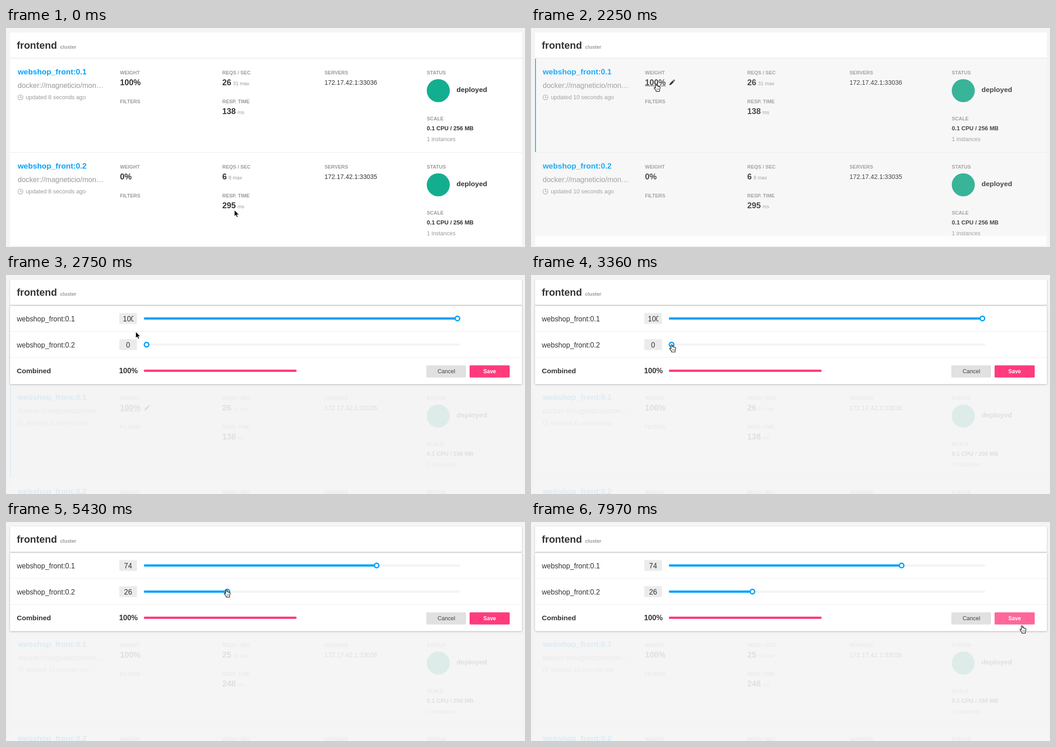
An HTML page for the animation above (8 s loop, 1152 by 486 pixels).

```html
<!DOCTYPE html>
<html lang="en">
<head>
<meta charset="utf-8">
<title>Cluster weights</title>
<style>
html, body { margin: 0; width: 100%; height: 100%; overflow: hidden; background: #f4f4f4; }
svg { display: block; font-family: "Liberation Sans", Arial, sans-serif; }
text { white-space: pre; }
</style>
</head>
<body>
<svg id="stage" width="1152" height="486" viewBox="0 0 1152 486"></svg>
<script>
const LOOP = 8000, DARK = '#333', GREY = '#999', BLUE = '#05a3fa', PINK = '#ff3b7c';
const stage = document.getElementById('stage');

const text = (x, y, size, str, fill = DARK, bold = false, extra = '') =>
  `<text x="${x}" y="${y}" font-size="${size}" fill="${fill}"${bold ? ' font-weight="700"' : ''} ${extra}>${str}</text>`;
const rect = (x, y, w, h, fill, extra = '') =>
  `<rect x="${x}" y="${y}" width="${w}" height="${h}" fill="${fill}" ${extra}/>`;
const group = (x, y, body, extra = '') => `<g transform="translate(${x} ${y})" ${extra}>${body}</g>`;
const label = (x, y, str) => text(x, y, 11, str, GREY, true);

// Pointer moves: start, end, number of steps, x and y reached
const START = [507, 404];
const MOVES = [
  [360, 360, 1, 456, 330],
  [530, 1150, 8, 289, 127],
  [1330, 1330, 1, 281, 127],
  [1600, 1770, 3, 278, 124],
  [2750, 2750, 1, 288, 126],
  [2900, 3450, 7, 313, 155],
  [4520, 4520, 1, 312, 155],
  [4810, 4810, 1, 336, 155],
  [4960, 5070, 2, 373, 153],
  [5220, 5430, 3, 489, 150],
  [5790, 6220, 6, 1081, 213],
  [6670, 6670, 1, 1081, 212],
  [7620, 7620, 1, 1083, 214],
  [7800, 7970, 3, 1090, 230]
];
const WEIGHTS = [[4960, 4], [5070, 9], [5220, 18], [5325, 24], [5430, 26]];

function pointer(t) {
  let [x, y] = START;
  for (const [t0, t1, n, tx, ty] of MOVES) {
    if (t < t0) break;
    const step = n > 1 ? Math.min(n, 1 + Math.floor((t - t0) / (t1 - t0) * (n - 1) + 1e-6)) : 1;
    const p = step / n, ease = n > 3 ? 1 - (1 - p) ** 2 : p;
    x += (tx - x) * ease;
    y += (ty - y) * ease;
  }
  return [x, y];
}

const SHAPES = {
  arrow: '<path d="M0 0V14L3.2 11 5.4 16 7.8 15 5.6 10.2H10Z" fill="#000" stroke="#fff" stroke-width=".9"/>',
  beam: '<path d="M-3-7.5Q-.5-7.5 0-6Q.5-7.5 3-7.5M0-6V6M-3 7.5Q-.5 7.5 0 6Q.5 7.5 3 7.5M-1.5 2H1.5" fill="none" stroke="#222" stroke-width="1.2"/>',
  hand: '<path d="M-1.6 9V1.5Q-1.6.2-.3.2T1 1.5V5Q3-.3 3.6 5.6Q5.6 4.6 6.2 6.4Q8.6 5.6 8.6 8.4Q8.6 11 7.4 13V16.6H-.4V14.6L-4.5 9.8Q-5.2 8.4-4 8Q-2.8 7.8-1.6 9Z" fill="#fff" stroke="#111" stroke-width="1.2"/>' +
    '<path d="M1.4 10.5V13M3.4 10.5V13M5.4 10.5V13" stroke="#333" stroke-width=".9"/>'
};

function cursor(t) {
  const [x, y] = pointer(t);
  const onThumb = t >= 3355 && t < 5790;
  const shape = t >= 1150 && t < 1600 ? 'beam'
    : t >= 1600 && t < 2750 || onThumb || t >= 6134 ? 'hand' : 'arrow';
  return group(x.toFixed(1), y.toFixed(1), SHAPES[shape]);
}

const CLOCK = `<g fill="none" stroke="${GREY}" stroke-width="1.1"><circle cx="32" cy="86" r="5.5"/><path d="M32 82.5V86.5H35"/></g>`;
const PENCIL = '<path d="M307 59L308 55.2 314.6 48.6 317.4 51.4 310.8 58ZM315.4 47.8L316.4 46.8Q317.2 46.2 318 47L319 48Q319.8 48.8 319.2 49.6L318.2 50.6Z" fill="#222"/>';

function service(y, s, age, hover, back, pulse) {
  const value = (top, num, unit) =>
    text(480, top, 18, num, DARK, true) + text(484 + 10 * String(num).length, top, 11, unit, GREY);
  return group(0, y,
    rect(9, 0, 1136, 208, back) +
    (hover ? rect(9, 0, 2, 207, '#12b0ea') + PENCIL : '') +
    text(26, 35, 17.2, s.name, BLUE, true) +
    text(26, 65, 16, 'docker://magneticio/mon…', GREY) +
    CLOCK + text(44, 90, 12.8, `updated ${age} seconds ago`, GREY) +
    label(253, 35, 'WEIGHT') + text(253, 59, 18, s.weight + '%', DARK, true) +
    (hover ? rect(253, 60, 46, 1, DARK) : '') +
    label(253, 99, 'FILTERS') +
    label(480, 35, 'REQS / SEC') + value(59, s.reqs, s.max + ' max') +
    label(480, 99, 'RESP. TIME') + value(123, s.ms, 'ms') +
    label(707, 35, 'SERVERS') + text(707, 58, 14, '172.17.42.1:' + s.port) +
    label(934, 35, 'STATUS') +
    `<circle cx="959.5" cy="71" r="25.6" fill="${pulse ? '#22ad8e' : '#13ae90'}"/>` +
    text(1000, 74, 15.5, 'deployed', DARK, true) +
    label(934, 137, 'SCALE') +
    text(934, 159, 12.8, '0.1 CPU / 256 MB', DARK, true) +
    text(934, 183, 12.6, '1 instances', GREY));
}

function list(t) {
  const open = t >= 2750, y = open ? 242 : 68;
  const hover = t >= 1600 && t < 3000, fresh = t >= 4960, fading = t >= 2250 && !open;
  const age = t < 2250 ? 8 : t < 2750 ? 10 : fresh ? 13 : 11;
  const opacity = t < 2250 ? 1 : t < 2420 ? .89 : open ? .1 : .4;
  const first = { name: 'webshop_front:0.1', weight: 100, port: 33036,
    reqs: fresh ? 25 : 26, max: fresh ? 33 : 31, ms: fresh ? 248 : 138 };
  const second = { name: 'webshop_front:0.2', weight: 0, port: 33035, reqs: 6, max: 8, ms: 295 };
  const shade = t < 1685 ? '#fbfbfb' : '#f8f8f8';
  return `<g opacity="${opacity}">` +
    service(y, first, age, hover, hover ? shade : '#fff', t >= 800) +
    service(y + 209, second, age, false, fading ? '#f8f8f8' : '#fff', t >= 800) +
    rect(9, y + 207.5, 1136, 1.5, '#f0f0f0') + '</g>' +
    (fading ? rect(9, 461, 1136, 23, '#fdfdfd') : '') +
    (open ? '' : rect(9, 484, 1136, 1, '#ebebeb'));
}

function slider(y, name, value) {
  const x = 312 + 6.9 * value;
  const num = value > 99 ? text(1.5, 18, 16, value) : text(13, 18, 16, value, DARK, false, 'text-anchor="middle"');
  return text(24, y + 6, 15.7, name) +
    rect(251.5, y - 12, 39, 24, '#ebebeb') +
    `<svg x="258" y="${y - 12}" width="25" height="24">${num}</svg>` +
    rect(306, y - 2.5, 702, 5, '#f4f4f4', 'rx="2"') +
    rect(306, y - 2.5, x - 306, 5, BLUE, 'rx="2"') +
    `<circle cx="${x}" cy="${y}" r="5" fill="#fff" stroke="${BLUE}" stroke-width="3"/>`;
}

function editor(t) {
  const value = WEIGHTS.reduce((v, [at, w]) => t >= at ? w : v, 0);
  const save = t < 6134 ? PINK : t < 7960 ? '#ff6c9e' : '#ff6699';
  return rect(9, 68, 1136, 174, '#fff', 'rx="2" style="filter:drop-shadow(0 1px 2px rgba(0,0,0,.26))"') +
    slider(96.5, 'webshop_front:0.1', 100 - value) +
    rect(9, 124.5, 1136, 1.2, '#efefef') +
    slider(154.5, 'webshop_front:0.2', value) +
    rect(9, 182.5, 1136, 1.2, '#efefef') +
    text(24, 218, 15.5, 'Combined', DARK, true) +
    text(251, 218, 16.2, '100%', DARK, true) +
    rect(306, 210, 339, 5, PINK, 'rx="2"') +
    rect(933, 200.5, 88, 27, '#e1e1e1', 'rx="2"') +
    text(977.5, 218, 12.6, 'Cancel', '#444', false, 'text-anchor="middle"') +
    rect(1029, 200.5, 89, 27, save, 'rx="2"') +
    text(1073.5, 218, 12, 'Save', '#fff', true, 'text-anchor="middle"');
}

function header(open) {
  const shadow = open ? 'style="filter:drop-shadow(0 1px 1.5px rgba(0,0,0,.26))"' : '';
  return rect(9, 10, 1136, 56.5, '#fff', 'rx="2" ' + shadow) +
    rect(9, 66, 1136, 1.6, open ? '#d6d6d6' : '#ececec') +
    text(24, 45.5, 22, 'frontend', DARK, true) +
    text(120, 45.5, 11, 'cluster', GREY, true);
}

let last = '';
function draw() {
  const t = performance.now() % LOOP, open = t >= 2750;
  const scene = rect(0, 0, 1152, 486, '#f4f4f4') + list(t) + (open ? editor(t) : '') + header(open) + cursor(t);
  if (scene !== last) stage.innerHTML = last = scene;
  requestAnimationFrame(draw);
}
draw();
</script>
</body>
</html>
```
